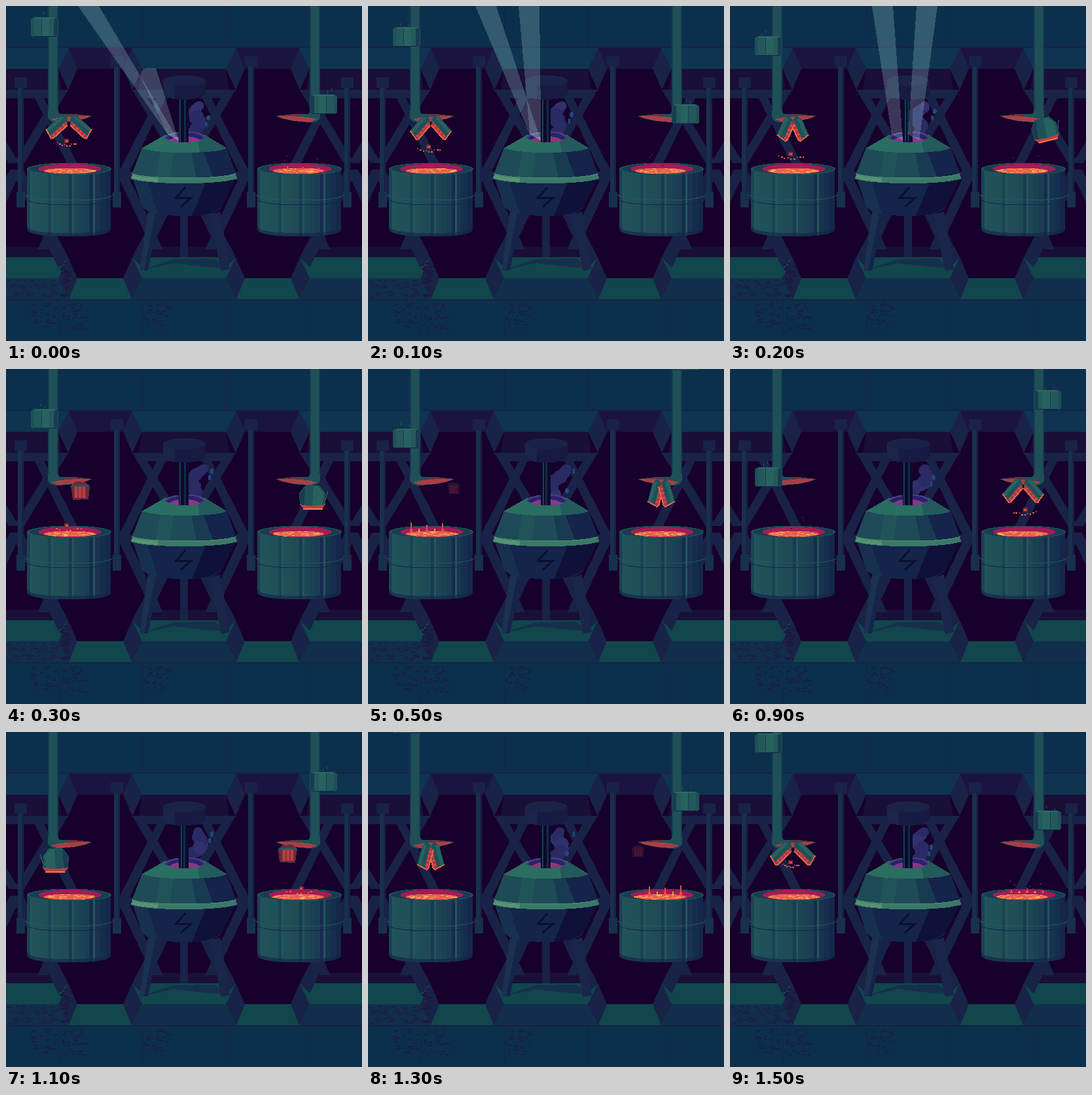
These frames come from a looping animation (544x512 px, 1600 ms). An HTML page:

```html
<!DOCTYPE html>
<html lang="en">
<head>
<meta charset="utf-8">
<title>Foundry</title>
<style>
html, body { margin: 0; width: 100%; height: 100%; overflow: hidden; background: #17002b; }
svg { display: block; width: 544px; height: 512px; shape-rendering: crispEdges; }
</style>
</head>
<body>
<svg viewBox="0 0 544 512" xmlns="http://www.w3.org/2000/svg">
  <g id="room"></g>
  <g id="moving"></g>
</svg>
<script>
const $ = id => document.getElementById(id);
const poly = (pts, fill, more = '') => `<polygon points="${pts}" fill="${fill}" ${more}/>`;
const path = (d, fill, more = '') => `<path d="${d}" fill="${fill}" ${more}/>`;
const line = (d, color, w = 1) => path(d, 'none', `stroke="${color}" stroke-width="${w}"`);
const rect = (x, y, w, h, fill, more = '') =>
  `<rect x="${x}" y="${y}" width="${w}" height="${h}" fill="${fill}" ${more}/>`;
const oval = (x, y, rx, ry, fill) => `<ellipse cx="${x}" cy="${y}" rx="${rx}" ry="${ry}" fill="${fill}"/>`;
const group = (how, s) => `<g transform="${how}">${s}</g>`;
const shift = (x, y, s) => group(`translate(${x} ${y})`, s);
const mirror = s => group('translate(544 0) scale(-1 1)', s);
const both = s => s + mirror(s);
const repeat = (n, f) => Array.from({ length: n }, (_, i) => f(i)).join('');

function random(seed) {
  return () => {
    seed = (seed * 16807 + 11) % 2147483647;
    return seed / 2147483647;
  };
}

const C = {
  wall: '#0c304c', seam: '#182246', beam: '#192247', post: '#18304d',
  night: '#17002b', dusk: '#190f37', floor: '#10464c', slab: '#112f4c',
  light: '#28625f', steel: '#1f5058', dim: '#183c52', navy: '#14244a', ink: '#101139',
  red: '#a83c42', hot: '#ee624a'
};

// One bay of the lattice, centred on x = 272
function bay() {
  const half =
    poly('193,128 208,128 276,240 260,240', C.beam) +
    poly('230,141 244,141 186,258 170,258', C.beam) +
    poly('170,258 186,258 240,372 224,372', C.beam) +
    rect(170, 253, 38, 13, C.beam) +
    poly('262,250 280,250 208,400 193,384', C.beam) +
    poly('192,64 208,96 193,128 179,96', C.beam) +
    poly('193,384 208,416 192,448 179,416', C.beam);
  return poly('208,96 336,96 341,128 203,128', C.dusk) +
    poly('204,368 340,368 351,384 193,384', C.dusk) +
    poly('192,64 352,64 336,96 208,96', '#0e3450') +
    poly('193,384 351,384 336,416 208,416', C.floor) +
    poly('208,416 336,416 352,448 192,448', C.slab) +
    both(half) + poly('192,128 352,128 341,141 203,141', C.beam);
}

function post(x, y) {
  return rect(x, y, 9, 306 - y, C.post) + rect(x + 6, y, 3, 306 - y, C.beam) +
    rect(x - 5, y - 2, 19, 16, C.beam) + rect(x - 2, 284, 13, 24, C.post);
}

function speckle(x, y, w, h, n, fill) {
  const rnd = random(x * 31 + n);
  return repeat(n, () => {
    const r = 1 + rnd() * 5 | 0;
    return rect(x + rnd() * w | 0, y + rnd() * h | 0, r + 1, 1 + (r >> 1), fill);
  });
}

function room() {
  let s = rect(0, 0, 544, 512, C.night);
  for (const x of [144, 400])
    s += poly(`${x - 48},64 ${x + 48},64 ${x + 35},96 ${x - 35},96`, '#1b1440') +
      poly(`${x - 35},416 ${x + 35},416 ${x + 48},448 ${x - 48},448`, C.floor);
  for (const dx of [-256, 0, 256]) s += shift(dx, 0, bay());
  s += rect(0, 0, 544, 63, C.wall) + rect(0, 62, 544, 2, C.seam) +
    rect(0, 449, 544, 63, C.wall) + rect(0, 448, 544, 2, C.seam);
  for (const x of [80, 208, 336, 464]) s += rect(x, 450, 1, 62, C.seam);
  for (const x of [208, 336]) s += rect(x, 0, 1, 62, C.seam);
  s += speckle(0, 418, 80, 28, 110, C.beam) + speckle(82, 392, 14, 52, 40, '#1b1941');
  for (const x of [36, 84, 209]) s += speckle(x, 453, 38, 40, 48, '#152246');
  return s + post(18, 111) + post(165, 79) + post(370, 79) + post(517, 111);
}

function barrel(id) {
  const body = 'M32 248V341Q34 352 97 352T160 341V248Z';
  const facets = repeat(16, i => {
    const u = i / 15;
    const shade = i ? .1 + .8 * u ** 2.2 + (i % 4 === 0 ? .25 : 0) : .4;
    return rect(32 + i * 8, 240, i % 4 ? 8 : 5, 114, C.navy, `opacity="${Math.min(1, shade).toFixed(2)}"`);
  });
  return `<clipPath id="${id}"><path d="${body}"/></clipPath><g clip-path="url(#${id})">` +
    rect(32, 240, 130, 114, '#22575b') + facets +
    path('M32 336Q34 347 97 347T161 336V354H32Z', C.navy, 'opacity=".6"') + '</g>' +
    line('M29 288Q36 297 97 297T164 288', '#23595b', 1) +
    line('M29 294Q36 304 97 304T164 294', C.navy, 1) +
    oval(96.5, 249, 64.5, 9.5, C.steel) + oval(97, 249, 61, 8, C.dim) +
    oval(97.5, 249, 48, 8, '#a31c56');
}

function machine() {
  const rim = 'M192 260Q212 267 272 267T352 260';
  return poly('206,404 256,387 318,386 342,402 300,398 256,393', '#16304b') +
    rect(266, 318, 12, 66, C.beam) +
    poly('217,314 235,318 217,404 204,404', '#1c3050') + poly('228,317 235,318 217,404 211,404', C.navy) +
    poly('311,319 327,314 342,402 329,405', '#192549') +
    path('M193 262L208 306Q220 321 272 321T330 306L352 262Z', C.navy) +
    path('M193 262L208 306Q214 315 232 318L216 268Z', '#17304f') +
    path('M352 262L330 306Q318 319 284 321L306 268Z', C.ink) +
    path('M208 216L192 258Q220 270 272 270T352 258L337 216Z', '#1e4b57') +
    poly('236,222 228,266 250,268 256,223', '#205459') +
    path('M300 222L318 266Q343 263 352 258L337 216Z', C.navy) +
    poly('283,223 292,269 318,266 301,221', '#183b52') +
    path('M243 197L208 217Q225 224 272 224T337 217L304 197Z', '#2a6e61') +
    path('M292 203L305 198L337 217Q327 223 296 223Z', '#235a5c') +
    line(rim, '#3b7868', 8) + line('M193 260Q200 264 232 266', '#579272', 6) +
    line('M192 256Q212 263 272 263T352 256', '#4f9071') +
    line('M274 277L260 293H283L267 307', '#0a0f30', 3);
}

function rod(k) {
  const glow = `hsl(${305 + 12 * Math.sin(k * 2)} 42% 38%)`;
  return path('M241 202Q244 193 273 192T305 202Q290 209 273 209T241 202Z', '#48407f') +
    path('M244 202Q250 195 273 194T302 202Q288 208 273 208T244 202Z', '#2b216b') +
    path('M248 206Q256 199 273 199T298 206Q288 208 273 208T248 206Z', glow) +
    rect(264, 132, 15, 76, '#0a0b2a') + rect(265 + k % 3, 134, 2, 74, '#164252') +
    rect(271 + (k + 1) % 3, 134, 3, 74, '#142a49') +
    path('M240 114V134Q246 143 272 143T305 134V114Z', '#171a41') +
    path('M240 114V134Q246 140 258 142V114Z', '#1a2549') + oval(272.5, 114, 32.5, 8, '#1b2248');
}

function smoke(k) {
  const puffs = repeat(18, i => {
    const u = (i * 7 + k) % 18 / 18;
    const swell = Math.sin(.5 + u * 2.2);
    const x = 281 + 18 * u + Math.sin(i * 2.4 + k * .8) * 9 * swell;
    return oval(x.toFixed(1), (198 - 48 * u).toFixed(1), 4 + 6 * swell, 4 + 6 * swell, i % 5 ? '#2a2a65' : '#30306c');
  });
  return puffs + repeat(5, i => {
    const u = (i * 3 + k) % 8 / 8;
    return oval(i % 2 ? 304 + u * 14 : 270 + u * 6, 186 - u * 40, 2 + i % 3, 3 + i % 2, '#24467a');
  });
}

// Top end of each ray by step: x, y
const RAYS = { 0: [[126, 0], [217, 97]], 1: [[180, 0], [246, 0]], 2: [[233, 0], [301, 0]], 7: [[242, 104]], 8: [[222, 0]] };
function rays(k) {
  return (RAYS[k] || []).map(([x, y]) => {
    const w = y > 100 ? 20 : y ? 12 : 16, foot = 256 + Math.max(0, x - 245) * .45;
    const cap = y ? `Q${x - w} ${y - 2} ${x} ${y - 2}H${x + w}` : `H${x + w}`;
    return path(`M${x - w} ${y + (y ? 10 : 0)}${cap}L${foot + 8} 206L${foot - 9} 196Z`, '#a4d0d4', 'opacity=".26"');
  }).join('');
}

function pipe() {
  return rect(64, 0, 16, 166, C.steel) + rect(64, 0, 2, 166, C.dim) + rect(78, 0, 2, 166, C.dim) +
    path('M64 160V170Q66 178 80 178L104 176L122 172L132 168L104 165H84Q80 165 80 160Z', C.steel) +
    path('M69 173Q92 167 131 168L121 172L101 176L78 177Z', '#a83f45') +
    poly('84,166 104,165 131,168 100,168', '#5a3640');
}

function crate(y, k) {
  const sparks = repeat(3, i => rect(44 + (i * 13 + k * 5) % 32, -3 - (i * 5 + k * 3) % 7, 1, 4, '#20555b'));
  return shift(0, y, rect(38, 1, 42, 29, C.steel, 'rx="4"') + rect(43, 0, 32, 30, '#24595b') +
    rect(54, 1, 12, 28, C.light) + rect(74, 2, 5, 27, C.dim) + rect(42, 29, 34, 1, C.navy) +
    line('M54.5 2V28M73.5 2V28', C.dim) + line('M44 1.5H75', '#347166') + sparks);
}

// Heated crate: q 0-2 hangs and swings
function pot(q) {
  const x = 63 + 13 * q, y = 189 + 7 * Math.sin(q * Math.PI / 2);
  return group(`translate(${x} ${y.toFixed(1)}) rotate(${14 - 14 * q})`,
    poly('-20,-6 -11,-18 11,-18 20,-6 19,12 13,18 -15,18 -20,11', C.steel) +
    poly('-17,-6 -9,-17 -2,-17 0,15 -15,14', C.light) + poly('10,-17 19,-6 18,12 13,14', C.dim) +
    path('M-20 11Q0 15 19 11L13 18H-15Z', '#b94044') + line('M-16 17.5H14', '#ff7951', 2) +
    line('M-20 4L-24 -9', '#34716a'));
}

// q 3-8: two halves open around a hinge, then close again
function halves(q) {
  const angle = 42 + 33 * ((q - 5.7) / 2.7) ** 2;
  const long = 39 - Math.max(0, q - 6) * 1.5;
  const ribs = repeat(4, i => rect(10 + i * 7, 3, 2, 6, '#d34d45'));
  const slab = poly(`-3,-3 6,-9 ${long - 4},-9 ${long},7 ${long - 3},9 7,9`, C.steel) +
    poly(`5,-8 ${long - 5},-8 ${long - 4},-3 2,-3`, C.light) +
    poly(`4,3 ${long - 1},3 ${long - 3},9 7,9`, C.red) + ribs +
    line(`M${long - 4} -9L${long} 7L${long - 3} 9H7`, C.hot, 2);
  const wing = group(`translate(3 0) rotate(${angle.toFixed(1)})`, slab);
  return shift(96, 171, wing + group('scale(-1 1)', wing));
}

// q 9-12: folded box shrinks into the dark
function folded(q) {
  const n = q - 9, size = 1 - n * .17;
  return `<g opacity="${(.55 ** n).toFixed(2)}">` +
    group(`translate(${113 + 9 * n} ${187 - 2 * n}) scale(${size.toFixed(2)})`,
      poly('-14,-9 -6,-15 9,-14 15,-7 13,12 -11,13', '#632b42') + rect(-9, -8, 18, 18, '#98343f') +
      line('M-6 -9V10M0 -9V10M6 -9V10', '#c9473f', 2) + line('M-13 -9H14', '#355056', 3)) + '</g>';
}

function debris(n) {
  const y = 202 + 6 * n + n * n, spread = 3 + n * .6;
  return rect(89, y - 6, 7, 6, '#7f2a3b') + rect(91, y - 4, 4, 3, '#d54c40') +
    repeat(9, i => rect(92 + (i - 4) * spread, y + 3 - Math.abs(i - 4) + i % 3, 2 + i % 2, 2, i % 3 ? C.hot : '#a22f45'));
}

function lava(p) {
  const rnd = random(430 + p * 29);
  let s = oval(97, 252, 39, 4.5, '#e7604c') + repeat(38, i => {
    const x = rnd() * 2 - 1, y = (rnd() * 2 - 1) * Math.sqrt(1 - x * x);
    return rect(97 + x * 36 | 0, 252 + y * 4 | 0, 3 + rnd() * 4 | 0, 1, i % 3 ? '#f5b44f' : '#f78148');
  });
  if (p < 4 || p > 10) return s;
  s += repeat(5, i => {
    const x = 66 + i * 12, h = (22 - 5 * Math.abs(p - 5)) * (.35 + .65 * Math.abs(Math.cos(i * Math.PI / 2)) * rnd());
    const y = p === 7 ? 246 : 250;
    return h > 2 ? poly(`${x - 2},${y} ${x},${y - h} ${x + 2},${y}`, i % 2 ? '#f5984a' : '#ed4d4b') : '';
  });
  if (p > 5) s += repeat(14 - p, () => rect(66 + rnd() * 52 | 0, 226 + rnd() * 18 | 0, 2, 2, p < 8 ? '#5c2350' : '#3b1947'));
  return s;
}

function station(p) {
  const q = (p + 6) % 16, fall = (p + 1) % 16, ride = (p + 3) % 16;
  let s = lava(p) + pipe();
  if (q < 3) s += pot(q);
  else if (q < 9) s += halves(q);
  else if (q < 13) s += folded(q);
  if (fall < 5) s += debris(fall);
  if (ride < 13) s += crate(Math.round(14.8 * ride - 27.6), p);
  return s;
}

$('room').innerHTML = room() + machine() + barrel('tubA') + shift(352, 0, barrel('tubB'));

let shown = -1;
function draw(now) {
  const k = Math.floor(now % 1600 / 100);
  if (k !== shown) {
    shown = k;
    $('moving').innerHTML = smoke(k) + rod(k) + rays(k) + station(k) + mirror(station((k + 8) % 16));
  }
  requestAnimationFrame(draw);
}
draw(0);
</script>
</body>
</html>
```
